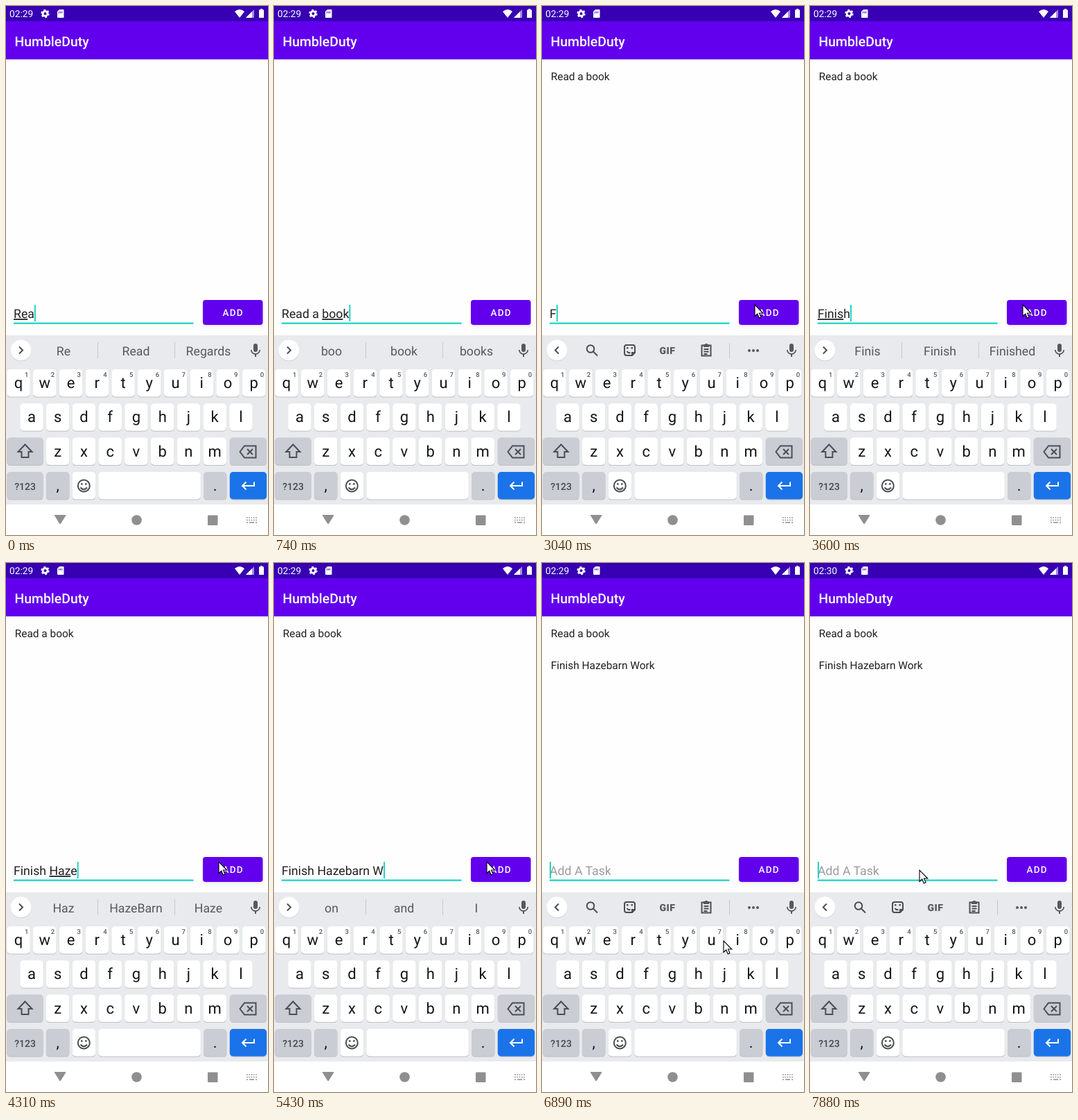
Recreate the animation shown at these times as an HTML page. Size 378x763 px, loop 7.99 s.

```html
<!DOCTYPE html>
<html lang="en">
<head>
<meta charset="utf-8">
<title>To-do list</title>
<style>
html, body { margin: 0; width: 100%; height: 100%; overflow: hidden; background: #fff; }
svg { display: block; width: 100%; height: 100%; font-family: Roboto, sans-serif; text-rendering: geometricPrecision; }
text { white-space: pre; }
.mid { text-anchor: middle; }
.line { fill: none; stroke: #4b4e53; stroke-width: 2; }
.icon { fill: #55585d; }
.item { font-size: 15.45px; fill: #202020; }
.entry { font-size: 17.7px; fill: #202020; }
.word { font-size: 17.7px; fill: #55585d; text-anchor: middle; }
.under { text-decoration: underline; text-decoration-thickness: 1px; text-decoration-skip-ink: none; }
</style>
</head>
<body>
<svg viewBox="0 0 378 763" preserveAspectRatio="none">
  <defs>
    <clipPath id="buttonClip"><rect x="284" y="424" width="86.5" height="36" rx="4"/></clipPath>
    <filter id="blur" x="-20%" y="-40%" width="140%" height="200%"><feGaussianBlur stdDeviation="2"/></filter>
  </defs>

  <rect width="378" height="763" fill="#fefefe"/>
  <rect width="378" height="77" fill="#6200ee"/>
  <rect width="378" height="22" fill="#3700b3"/>
  <g fill="#fff">
    <text id="clock" x="5" y="16" font-size="13.7"></text>
    <g fill="none" stroke="#fff">
      <circle cx="56.5" cy="11" r="3.4" stroke-width="2.8"/>
      <circle cx="56.5" cy="11" r="5.2" stroke-width="2" stroke-dasharray="2.7 2.745"/>
    </g>
    <path d="M77 5h5.500q1 0 1 1v10q0 1-1 1h-7.500q-1 0-1-1V8z"/>
    <path d="M76.300 8v2.500m2.200-2.500v2.500m2.200-2.500v2.500" stroke="#3700b3"/>
    <path d="M330 8q7-6 14 0l-7 9z"/>
    <path d="M346 17L358 5v12z" opacity=".55"/>
    <path d="M346 17L355 8v9z"/>
    <path d="M367 4h3v1.500h2V17h-7V5.500h2z"/>
    <text x="12.500" y="57.500" font-size="19.4" font-weight="500">HumbleDuty</text>
  </g>

  <text id="item1" class="item" x="12.7" y="106.500">Read a book</text>
  <text id="item2" class="item" x="12.7" y="152.900">Finish Hazebarn Work</text>

  <rect x="11" y="456.500" width="259.500" height="2.300" fill="#20d3c6"/>
  <text id="hint" class="entry" x="11" y="450" style="fill:#9b9b9b">Add A Task</text>
  <text id="entry" class="entry" x="11" y="450"><tspan></tspan><tspan class="under"></tspan><tspan></tspan></text>
  <rect id="caret" y="431" width="2" height="24" fill="#20d3c6"/>

  <rect id="shadow" x="284" y="427" width="86.500" height="36" rx="4" filter="url(#blur)"/>
  <rect x="284" y="424" width="86.500" height="36" rx="4" fill="#6200ee"/>
  <g clip-path="url(#buttonClip)"><circle id="ripple" fill="#fff"/></g>
  <text x="312.500" y="447.200" font-size="13.5" font-weight="500" letter-spacing="1.2" fill="#fff">ADD</text>

  <rect y="475" width="378" height="244" fill="#e8eaed"/>
  <circle cx="21.500" cy="497.300" r="15" fill="#c9cbcf"/>
  <circle cx="21.500" cy="496.500" r="15" fill="#fff"/>
  <path id="chevron" class="line"/>
  <path class="icon" transform="translate(348 485)" d="M12 14a3 3 0 0 0 3-3V5a3 3 0 0 0-6 0v6a3 3 0 0 0 3 3zm5.300-3c0 3-2.540 5.100-5.300 5.100S6.700 14 6.700 11H5c0 3.410 2.720 6.230 6 6.720V21h2v-3.280c3.280-.48 6-3.300 6-6.720z"/>
  <g id="words">
    <path d="M132.500 485v23m111-23v23" stroke="#c6c8cc"/>
    <text class="word" x="83" y="503.500"></text>
    <text class="word" x="187.500" y="503.500"></text>
    <text class="word" x="292" y="503.500"></text>
  </g>
  <g id="tools">
    <circle class="line" cx="70" cy="494.500" r="5.300"/>
    <path class="line" d="M74 498.500l6 6M130 504h-8q-3 0-3-3v-9q0-3 3-3h9q3 0 3 3v8zv-4h4M122.500 498q2 3 5 2"/>
    <path class="icon" d="M122 492h2.500v2.500H122zm6.500 0h2.500v2.500h-2.500z"/>
    <text class="mid icon" x="181" y="501.500" font-size="14" font-weight="900" letter-spacing=".5">GIF</text>
    <path class="line" d="M230.500 489.500h13v15h-13zM233.500 495h7m-7 3.500h7m-7 3.500h5" stroke-width="1.600"/>
    <path class="icon" d="M233 488h2q2-2.500 4 0h2v4h-8z"/>
    <path d="M270.500 486v22" stroke="#c6c8cc"/>
    <g class="icon"><circle cx="299" cy="497" r="2"/><circle cx="305" cy="497" r="2"/><circle cx="311" cy="497" r="2"/></g>
  </g>

  <g id="keys"></g>
  <g class="line">
    <path d="M27.500 632.500l-10 10.500h5v8h10v-8h5z"/>
    <path d="M337.500 643l6.500-8.500h16.500v17H344zM348 639l8 8m0-8l-8 8"/>
    <circle cx="112.300" cy="692" r="8.500"/>
    <path d="M107.500 694.500q4.800 5.500 9.600 0"/>
    <path d="M358 686.500v5.500h-17m5.500-5.500l-5.500 5.500 5.500 5.500" stroke="#fff"/>
  </g>
  <g class="icon"><circle cx="109.300" cy="689.500" r="1.400"/><circle cx="115.300" cy="689.500" r="1.400"/></g>

  <rect y="719" width="378" height="44" fill="#fff"/>
  <g fill="#8f8f8f">
    <path d="M70.500 734h15q1.500 0 .6 1.300l-7 11.200q-1 1.400-2 0l-7-11.200q-.9-1.300.4-1.300z"/>
    <circle cx="188.500" cy="741.500" r="7.300"/>
    <rect x="291" y="734.500" width="14.500" height="14.500" rx="1"/>
  </g>
  <path d="M347 738h15M347 741.500h15" stroke="#8f8f8f" stroke-width="1.600" stroke-dasharray="1.700 1.600"/>
  <path d="M347 745h2m2 0h7m2 0h2" stroke="#8f8f8f" stroke-width="1.600"/>

  <path id="pointer" d="M0 0V16.500l3.800-3.500 2.500 5.900 2.700-1.200-2.500-5.700h5.300z" fill="#fff" stroke="#000" stroke-width="1.100"/>
</svg>
<script>
const LOOP = 7990;
const $ = id => document.getElementById(id);
const setAttrs = (el, attrs) => { for (const name in attrs) el.setAttribute(name, attrs[name]); };

function add(tag, attrs, text = "") {
  const el = document.createElementNS($("keys").namespaceURI, tag);
  setAttrs(el, attrs);
  el.textContent = text;
  $("keys").append(el);
}

function key(x, y, width, fill, label = "", size = 22, color = "#151515") {
  const box = { x, width, height: 39.5, rx: 5 };
  add("rect", { ...box, y: y + 1.1, fill: "#bfc1c5" });
  add("rect", { ...box, y, fill });
  add("text", { x: x + width / 2, y: y + (size < 20 ? 25.5 : 27), class: "mid", fill: color,
    "font-size": size, "font-weight": size < 20 ? 500 : 400 }, label);
}

const GREY = "#cacdd3";
[["qwertyuiop", 1.3, 524], ["asdfghjkl", 20.2, 573.2], ["zxcvbnm", 57.9, 622.5]].forEach(([letters, left, y]) =>
  [...letters].forEach((letter, i) => {
    const x = left + i * 37.75;
    key(x, y, 33.5, "#fff", letter);
    if (y === 524) add("text", { x: x + 28.5, y: 535, class: "mid", fill: "#55585d", "font-size": 9.5, "font-weight": 500 }, (i + 1) % 10);
  }));
key(1.3, 622.5, 52.5, GREY);
key(322.8, 622.5, 53.3, GREY);
key(1.3, 672, 52.5, GREY, "?123", 14, "#45484d");
key(57.9, 672, 33.5, GREY, ",");
key(95.6, 672, 33.5, "#fff");
key(133.3, 672, 147.5, "#fff");
key(285, 672, 33.5, GREY, ".");
key(322.8, 672, 53.3, "#1a73e8");

// Typed text with the composing part in brackets, then suggestions (empty shows the toolbar).
const typing = [
  [0, "[Re]a", "Re Read Regards"],
  [120, "[Rea]d", "Rea Read Ready"],
  [240, "Read ", "Read Reading Ready"],
  [370, "Read a", "the and it"],
  [490, "Read a ", "a about and"],
  [610, "Read a bo", "book good few"],
  [740, "Read a [boo]k", "boo book books"],
  [990, "Read a [book]", "book booking booklet"],
  [2090, "", ""],
  [3040, "F", ""],
  [3150, "[F]i", "F For From"],
  [3270, "[Fi]n", "Fi Find First"],
  [3390, "[Fin]i", "Fin Find Fine"],
  [3510, "[Fini]s", "Fini Finish Finite"],
  [3600, "[Finis]h", "Finis Finish Finished"],
  [3700, "[Finish]", "Finish Finished Finishing"],
  [3940, "Finish H", "the my it"],
  [4060, "Finish [H]az", "H He Have"],
  [4310, "Finish [Haz]e", "Haz HazeBarn Haze"],
  [4430, "Finish [Haze]", "Haze HazeBarn Hazel"],
  [4560, "Finish [Haze]b", "Haze HazeBarn Hazel"],
  [4800, "Finish [Hazeb]a", "Hazeb HazeBarn Haze"],
  [4920, "Finish [Hazeba]r", "Hazeba HazeBarn Haze"],
  [5050, "Finish [Hazebar]n", "Hazebar HazeBarn Haze"],
  [5180, "Finish Hazebarn ", ""],
  [5300, "Finish Hazebarn ", "on and I"],
  [5430, "Finish Hazebarn W", "on and I"],
  [5550, "Finish Hazebarn Wo", ""],
  [5670, "Finish Hazebarn [Wo]r", "Wo Work Working"],
  [5790, "Finish Hazebarn [Wor]k", "Wor Work World"],
  [6040, "Finish Hazebarn [Work]", "Work Working Works"],
  [6770, "", ""]
];
const pointer = [
  [0, 400, 480], [1740, 364, 462], [1860, 318, 441], [1970, 313, 436], [2210, 309, 433], [2330, 307, 431],
  [6040, 353, 423], [6160, 345, 434], [6650, 341, 438], [6890, 262, 545],
  [7010, 190, 617], [7130, 160, 448], [7250, 158, 443]
];
// Centre x, radius, opacity, shadow opacity.
const ripple = [
  [0, 0, 0, 0, .07], [1970, 317, 35, .24, .28], [2090, 324, 55, .24, .28], [2210, 327, 60, .12, .2], [2330, 0, 0, 0, .07],
  [6410, 342, 14, .2, .15], [6530, 335, 36, .24, .28], [6650, 330, 55, .24, .28], [6770, 327, 60, .12, .2], [6890, 0, 0, 0, .07]
];
const caretOff = [[1490, 1970], [2580, 3040], [7250, 7750]];

const at = (track, t) => track.findLast(step => step[0] <= t);
const show = (id, on) => { $(id).style.display = on ? "" : "none"; };

function draw(t) {
  const [, typed, words] = at(typing, t);
  const [before, under = "", after = ""] = typed.split(/[[\]]/);
  [before, under, after].forEach((part, i) => { $("entry").children[i].textContent = part; });
  show("hint", !typed);
  $("caret").setAttribute("x", 11 + (typed ? $("entry").getComputedTextLength() : 0));
  show("caret", !caretOff.some(([from, to]) => t >= from && t < to));

  show("words", words);
  show("tools", !words);
  words.split(" ").forEach((word, i) => { $("words").children[i + 1].textContent = word; });
  $("chevron").setAttribute("d", words ? "M19 491.500l5 5-5 5" : "M24 491.500l-5 5 5 5");

  show("item1", t >= 2090);
  show("item2", t >= 6770);
  $("clock").textContent = t < 7880 ? "02:29" : "02:30";

  const [, x, y] = at(pointer, t);
  $("pointer").setAttribute("transform", `translate(${x} ${y})`);
  const [, cx, r, opacity, shade] = at(ripple, t);
  setAttrs($("ripple"), { cx, cy: 442, r, opacity });
  $("shadow").setAttribute("opacity", shade);
}

function tick() {
  draw(performance.now() % LOOP);
  requestAnimationFrame(tick);
}
tick();
</script>
</body>
</html>
```
